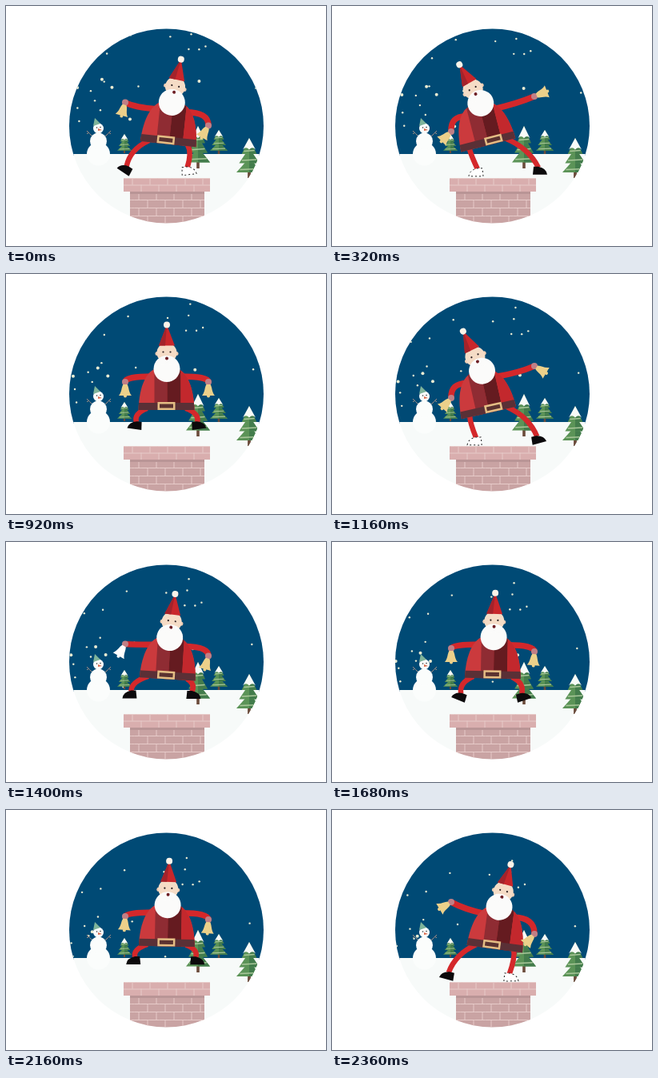
An HTML page with a canvas for the animation above (2.4 s loop, 400x300 px).

```html
<!DOCTYPE html>
<html>
<head>
<meta charset="utf-8">
<style>
html, body { margin: 0; width: 100%; height: 100%; overflow: hidden; background: #fff; }
canvas { display: block; width: 400px; height: 300px; }
</style>
</head>
<body>
<canvas id="stage" width="400" height="300"></canvas>
<script>
const ctx = document.getElementById('stage').getContext('2d');
const LOOP = 2400, STEP = 40, DANCE = 800, HORIZON = 185, MIDDLE = 201;
const RAD = Math.PI / 180;
const wave = (t, period, peak) => Math.cos(2 * Math.PI * (t - peak) / period);

function seeded(seed) {
  return () => (seed = seed * 16807 % 2147483647) / 2147483647;
}

function shape(points, color) {
  ctx.beginPath();
  points.forEach(([x, y]) => ctx.lineTo(x, y));
  ctx.closePath();
  ctx.fillStyle = color;
  ctx.fill();
}

function disc(x, y, r, color) {
  ctx.beginPath();
  ctx.arc(x, y, r, 0, 7);
  ctx.fillStyle = color;
  ctx.fill();
}

function rect(x, y, w, h, color) {
  ctx.fillStyle = color;
  ctx.fillRect(x, y, w, h);
}

function limb(from, bend, to, width, color) {
  ctx.beginPath();
  ctx.moveTo(...from);
  ctx.quadraticCurveTo(...bend, ...to);
  ctx.lineWidth = width;
  ctx.strokeStyle = color;
  ctx.stroke();
}

function line(x1, y1, x2, y2, width, color) {
  limb([x1, y1], [x1, y1], [x2, y2], width, color);
}

function at(x, y, degrees, draw) {
  ctx.save();
  ctx.translate(x, y);
  ctx.rotate(degrees * RAD);
  draw();
  ctx.restore();
}

function snowfall(time) {
  const random = seeded(77);
  for (let i = 0; i < 24; i++) {
    const big = i % 4 === 0, speed = big ? 28 : 18;
    const x = 84 + random() * 232, y = 20 + random() * 125;
    const s = time / 1000;
    disc(x - speed * .2 * s, y + speed * s, big ? 2 : 1.2, '#e9ebd2');
  }
}

function tree(x, top, w, h) {
  const y = k => top + h * k;
  rect(x - w * .06, y(.8), w * .12, h * .2, '#6b4c3c');
  for (let tier = 2; tier >= 0; tier--) {
    const r = w * (.29 + tier * .105), a = tier * .25, b = .4 + tier * .23;
    shape([[x, y(a)], [x + r, y(b)], [x - r, y(b)]], '#5b9357');
    shape([[x, y(a)], [x + r, y(b)], [x, y(b)]], '#437c4c');
    line(x - r * .72, y(b - .07), x + r * .72, y(b - .09), w * .05, '#a9c79a');
  }
  const r = w * .25;
  ctx.beginPath();
  ctx.moveTo(x, top);
  ctx.lineTo(x + r, y(.29));
  ctx.quadraticCurveTo(x + r * .5, y(.2), x, y(.29));
  ctx.quadraticCurveTo(x - r * .5, y(.2), x - r, y(.29));
  ctx.fillStyle = '#f8fbf8';
  ctx.fill();
}

function snowman() {
  [-1, 1].forEach(side => {
    const x = 116 + side * 15;
    line(116 + side * 7, 164, x, 156, 1, '#a58f83');
    line(x - side * 2, 159, x, 159.5, 1, '#a58f83');
  });
  for (let i = 0; i < 3; i++) disc(115.5, 185 - i * 16, 14.5 - i * 4, '#fbfdfc');
  shape([[111, 140], [109, 150], [118, 147]], '#7fb49a');
  disc(113.5, 152, .8, '#333');
  disc(118, 151.5, .8, '#333');
  shape([[115, 153], [120, 155], [115, 156]], '#d9684a');
}

function bricks(x, y, w, rows, h, color) {
  const joint = '#e7cbc9';
  rect(x, y, w, rows * h, color);
  for (let row = 0; row < rows; row++) {
    const top = y + row * h;
    line(x, top + .5, x + w, top + .5, 1, joint);
    for (let bx = x + 11 + row % 2 * 11; bx < x + w; bx += 22) {
      line(bx, top, bx, top + h, 1, joint);
    }
  }
}

function scenery(time) {
  rect(78, 27, 246, 160, '#004a75');
  snowfall(time);
  rect(78, HORIZON, 246, 90, '#f7faf9');
  snowman();
  tree(148, 160, 18, 24);
  tree(266, 155, 22, 30);
  tree(240, 150, 30, 53);
  tree(304, 165, 32, 50);
  bricks(155, 232, 93, 4, 10, '#c9a3a3');
  rect(155, 232, 93, 3, '#b99596');
  bricks(147, 215, 108, 2, 8.5, '#d9aeae');
}

// Sway runs from -1 (left) to 1 (right); he hops between the two sides.
function poseAt(phase) {
  const raw = -wave(phase, DANCE, 320), sway = raw * Math.abs(raw);
  const lean = sway * (1.25 - .35 * sway);
  const dip = Math.abs(sway);
  return {
    sway, lean,
    hop: .5 + .5 * wave(phase, DANCE / 2, 150),
    swing: (.5 + .5 * wave(phase, DANCE / 2, 285)) ** 2,
    push: Math.max(0, wave(phase, DANCE / 2, 40)),
    belt: [200.5 + 4 * lean, 165 + 4 * dip, 9 * lean],
    beard: [201 + 9.5 * lean, 118.5 + 3 * dip, 18 * lean]
  };
}

function onCoat([ox, oy, tilt], x, y) {
  const c = Math.cos(tilt * RAD), s = Math.sin(tilt * RAD);
  return [ox + x * c - y * s, oy + x * s + y * c];
}

function shoe(side, white) {
  ctx.scale(side, 1);
  ctx.beginPath();
  ctx.moveTo(-6, -5);
  ctx.lineTo(0, -5);
  ctx.quadraticCurveTo(10, -3, 11, 5);
  ctx.lineTo(-7, 5);
  ctx.closePath();
  ctx.fillStyle = white ? '#fff' : '#0c0a0c';
  ctx.fill();
  if (!white) return;
  ctx.setLineDash([2, 3]);
  ctx.lineWidth = 1;
  ctx.strokeStyle = '#222';
  ctx.stroke();
  ctx.setLineDash([]);
}

function leg(pose, side) {
  const lift = -side * pose.sway;
  const hip = onCoat(pose.belt, side * 24, 3);
  const x = MIDDLE + side * (38 + 19 * lift), y = 209 - 2 * Math.max(0, lift) - 21 * pose.hop;
  const reach = .8 - .25 * Math.max(0, lift);
  const knee = [hip[0] + (x - hip[0]) * reach + side * 6, hip[1] + (y - hip[1]) * .3];
  limb(hip, knee, [x, y - 4], 6.5, '#d4282b');
  at(x, y, -side * 25 * pose.push * (1 + lift), () => shoe(side, lift < -.5));
}

function handAt(pose, side) {
  const lift = -side * pose.sway;
  const up = 90 - side * 130 * pose.swing * Math.sqrt(Math.max(0, lift));
  return {
    lift,
    x: MIDDLE + side * 52,
    y: 135 - 22 * lift,
    angle: lift > 0 ? up : 90 - 45 * lift
  };
}

function arm(pose, side) {
  const { x, y, lift } = handAt(pose, side);
  const [sx, sy] = onCoat(pose.belt, side * 18, -37);
  const raised = Math.max(0, lift);
  const elbow = [sx + (x - sx) * (.9 - .35 * raised) + side * 3 * (1 - raised), sy + (y - sy) * .4 * raised];
  limb([sx, sy], elbow, [x, y], 7.5, '#d3282b');
}

function bell(pose, side, white) {
  const { x, y, angle } = handAt(pose, side);
  const color = white ? '#fff' : '#ecd08a';
  disc(x, y, 4, '#c07f86');
  at(x, y, angle - 90, () => {
    disc(0, 17.5, 2, color);
    ctx.beginPath();
    ctx.moveTo(-2.5, 3);
    ctx.lineTo(2.5, 3);
    ctx.bezierCurveTo(5, 7, 4, 12, 8, 17);
    ctx.lineTo(-8, 17);
    ctx.bezierCurveTo(-4, 12, -5, 7, -2.5, 3);
    ctx.fillStyle = color;
    ctx.fill();
  });
}

function coat(lean) {
  ctx.save();
  ctx.beginPath();
  ctx.moveTo(-35, 5);
  ctx.bezierCurveTo(-34, -25, -25, -45, -10, -48);
  ctx.lineTo(10, -48);
  ctx.bezierCurveTo(25, -45, 34, -25, 35, 5);
  ctx.closePath();
  ctx.clip();
  rect(-40, -50, 80, 56, '#cb3a3d');
  rect(-15, -50, 16, 56, '#8f2c33');
  rect(1, -50, 17, 56, '#651b20');
  rect(18, -50, 30, 56, '#c3282d');
  rect(-40, -4, 80, 10, '#5a3036');
  ctx.restore();
  const buckle = -5 * lean;
  rect(buckle - 11, -5, 22, 10, '#e4bd84');
  rect(buckle - 8.5, -2.5, 17, 5, '#5b3230');
}

function head() {
  [-1, 1].forEach(side => disc(side * 12, -19, 2.5, '#eccbb2'));
  disc(0, -20, 12.5, '#f5dcc6');
  disc(0, 0, 16.5, '#fbfbfa');
  [-1, 1].forEach(side => {
    disc(side * 5, -10, 5, '#fbfbfa');
    disc(side * 4.5, -21, 1.1, '#2b2022');
  });
  disc(0, -13, 2, '#6e1f25');
  shape([[0, -55], [10, -29], [-10, -29]], '#c9272b');
  shape([[0, -55], [-2, -29], [-10, -29]], '#a3232b');
  disc(0, -55, 4, '#fbf3e9');
}

function santa(phase) {
  const pose = poseAt(phase), sides = [-1, 1];
  const glint = Math.abs(phase - 620) < 40;
  sides.forEach(side => leg(pose, side));
  sides.forEach(side => arm(pose, side));
  at(...pose.belt, () => coat(pose.lean));
  sides.forEach(side => bell(pose, side, glint && side < 0));
  at(...pose.beard, head);
}

function frame(now) {
  const time = Math.floor(now % LOOP / STEP) * STEP;
  rect(0, 0, 400, 300, '#fff');
  ctx.save();
  ctx.beginPath();
  ctx.arc(200.5, 150, 121.5, 0, 7);
  ctx.clip();
  scenery(time);
  santa(time % DANCE);
  ctx.restore();
}

const start = performance.now();
function tick() {
  frame(performance.now() - start);
  requestAnimationFrame(tick);
}
tick();
</script>
</body>
</html>
```
